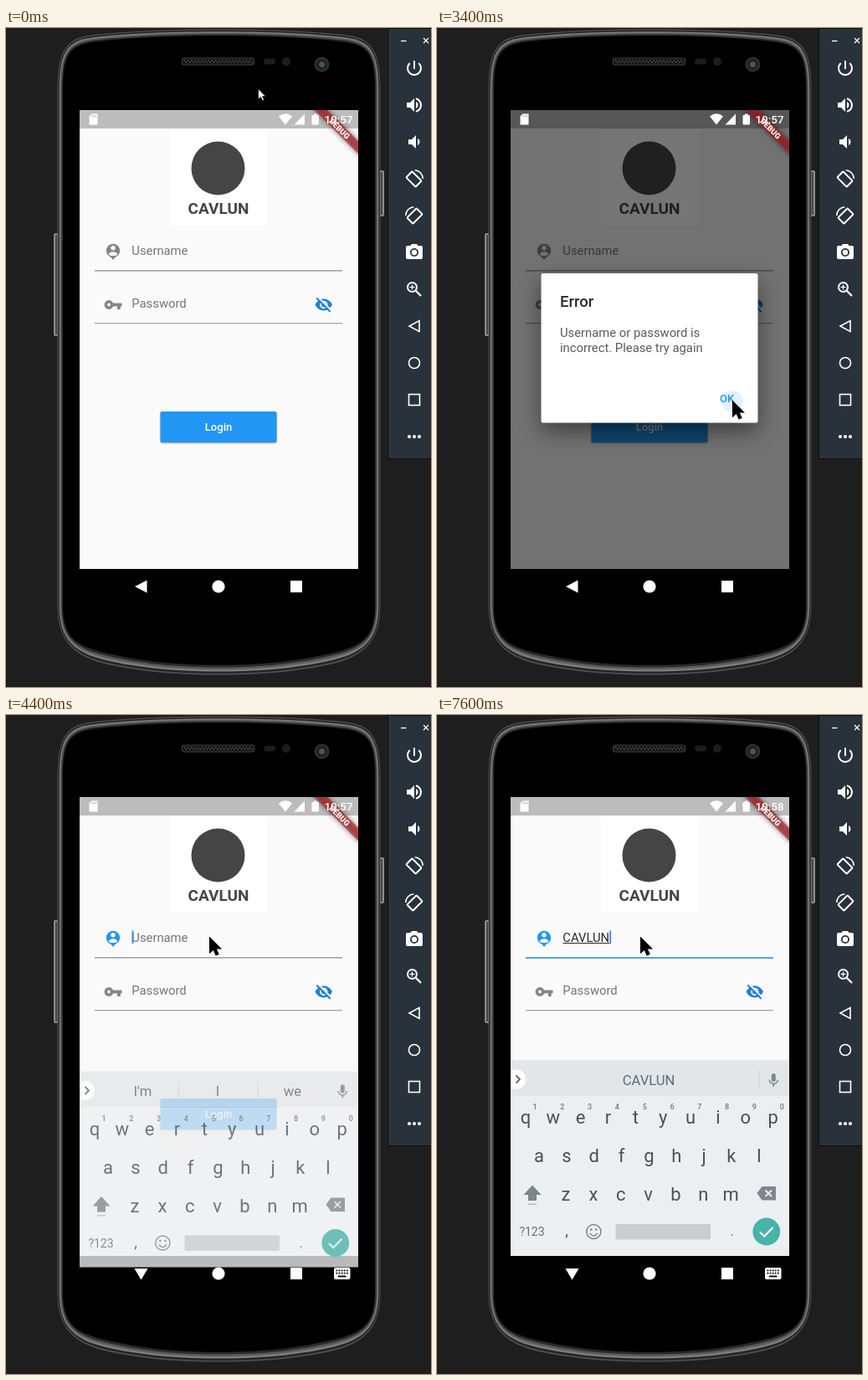
An HTML page with a canvas that plays this animation: 508x787 px, repeating every 8000 ms.

```html
<!DOCTYPE html>
<html lang="en">
<head>
<meta charset="utf-8">
<title>Login demo</title>
<style>
html, body { margin: 0; width: 100%; height: 100%; overflow: hidden; background: #1e1e1e; }
canvas { display: block; }
</style>
</head>
<body>
<canvas id="stage" width="508" height="787"></canvas>
<script>
const ctx = document.getElementById('stage').getContext('2d');
const LOOP = 8000, TICK = 1000 / 15;
const BLUE = '#2196f3', NAME = 'CAVLUN';
const clamp = v => Math.max(0, Math.min(1, v));
const smooth = v => v * v * (3 - 2 * v);

// --- helpers -------------------------------------------------------------
function rect(x, y, w, h, color, r = 0) {
  ctx.fillStyle = color;
  ctx.beginPath();
  ctx.roundRect(x, y, w, h, r);
  ctx.fill();
}
function disc(x, y, r, color) {
  ctx.fillStyle = color;
  ctx.beginPath();
  ctx.arc(x, y, r, 0, Math.PI * 2);
  ctx.fill();
}
function ring(x, y, r, color, w, a = 0, b = Math.PI * 2) {
  ctx.strokeStyle = color;
  ctx.lineWidth = w;
  ctx.beginPath();
  ctx.arc(x, y, r, a, b);
  ctx.stroke();
}
function trace(pts, closed) {
  ctx.beginPath();
  for (let i = 0; i < pts.length; i += 2) ctx.lineTo(pts[i], pts[i + 1]);
  if (closed) ctx.closePath();
}
function poly(color, ...pts) {
  trace(pts, true);
  ctx.fillStyle = color;
  ctx.fill();
}
function line(color, w, ...pts) {
  trace(pts, false);
  ctx.strokeStyle = color;
  ctx.lineWidth = w;
  ctx.stroke();
}
function text(str, x, y, size, color, weight = 400, align = 'left') {
  ctx.font = `${weight} ${size}px Roboto, sans-serif`;
  ctx.textAlign = align;
  ctx.fillStyle = color;
  ctx.fillText(str, x, y);
}
function at(x, y, draw, turn = 0) {
  ctx.save();
  ctx.translate(x, y);
  ctx.rotate(turn);
  draw();
  ctx.restore();
}
function shadow(color, blur, dy) {
  ctx.shadowColor = color;
  ctx.shadowBlur = blur;
  ctx.shadowOffsetY = dy;
}

// --- phone ---------------------------------------------------------------
// Outline inset by d; the rim is wider at the top and bottom ends.
function body(d) {
  const l = 61.5 + d, r = 447.5 - d, t = 1.5 + d * 1.2, b = 772.5 - d * 1.8;
  ctx.beginPath();
  ctx.moveTo(l, 690);
  ctx.lineTo(l, 75);
  ctx.bezierCurveTo(l, 30, l + 8, t + 11, l + 40, t + 7);
  ctx.bezierCurveTo(l + 90, t + 1, 210, t, 254.5, t);
  ctx.bezierCurveTo(299, t, r - 90, t + 1, r - 40, t + 7);
  ctx.bezierCurveTo(r - 8, t + 11, r, 30, r, 75);
  ctx.lineTo(r, 690);
  ctx.bezierCurveTo(r, 733, r - 20, b - 21, r - 62, b - 12);
  ctx.bezierCurveTo(r - 110, b - 2, 295, b, 254.5, b);
  ctx.bezierCurveTo(214, b, l + 110, b - 2, l + 62, b - 12);
  ctx.bezierCurveTo(l + 20, b - 21, l, 733, l, 690);
  ctx.closePath();
}
function phone() {
  for (const [x, y, h] of [[57, 245, 123], [446, 170, 55]]) {
    rect(x, y, 6, h, '#8c8c8c', 2);
    rect(x + 2, y + 2, 2, h - 4, '#484848');
  }
  const rims = [[0, '#4e4e4e'], [1, '#232323'], [2.2, '#7c7c7c'], [3.6, '#5a5a5a'], [5, '#2a2a2a'], [6.5, '#000']];
  for (const [d, color] of rims) {
    body(d);
    ctx.fillStyle = color;
    ctx.fill();
  }
  rect(210, 35.5, 87, 9, '#444', 3);
  rect(211, 36.5, 85, 7, '#151515', 2);
  for (let i = 0; i < 40; i++) rect(213 + i * 2.05, 38 + (i % 2) * 2, 1.2, 2, '#555');
  rect(308, 36.5, 14, 7, '#1d1d1d', 3.5);
  disc(335, 40, 5, '#1d1d1d');
  disc(377.5, 43.5, 9, '#2b3236');
  disc(377.5, 43.5, 6.5, '#1a2024');
  disc(377.5, 43.5, 3.5, '#46545c');
}

// --- emulator toolbar ----------------------------------------------------
function speaker(loud) {
  poly('#fff', -9, -3, -5, -3, 0, -8, 0, 8, -5, 3, -9, 3);
  ctx.fillStyle = '#fff';
  ctx.beginPath();
  ctx.arc(0, 0, 4.5, -1.1, 1.1);
  ctx.fill();
  if (loud) ring(0, 0, 8, '#fff', 2, -1.32, 1.32);
}
function rotateIcon(dir) {
  ctx.scale(dir, 1);
  at(-0.5, 0.5, () => {
    ctx.strokeStyle = '#fff';
    ctx.lineWidth = 2;
    ctx.beginPath();
    ctx.roundRect(-5, -8, 10, 16, 1);
    ctx.stroke();
  }, -Math.PI / 4);
  ring(0, 0, 10.3, '#fff', 1.6, -1.5, 0);
}
function toolbar() {
  rect(456, 0, 52, 515, '#0b0e10');
  rect(457, 1, 51, 513, '#29323a');
  const W = '#fff';
  line(W, 1.3, 472, 15.5, 478.5, 15.5);
  line(W, 1.3, 499, 12, 505, 18);
  line(W, 1.3, 505, 12, 499, 18);
  ring(488, 48, 8, W, 2, -0.85, Math.PI + 0.85);
  line(W, 2, 488, 39, 488, 49);
  at(488, 92, () => speaker(true));
  at(490, 136, () => speaker(false));
  at(488, 180, () => rotateIcon(1));
  at(488, 224, () => rotateIcon(-1));
  rect(478, 260, 20, 16, W, 2);
  poly(W, 483, 260.5, 485, 258, 491, 258, 493, 260.5);
  disc(488, 268, 5, '#29323a');
  disc(488, 268, 3.2, W);
  ring(485.5, 309.5, 5.5, W, 2);
  line(W, 2.4, 489.5, 313.5, 496, 320);
  line(W, 1.3, 482.5, 309.5, 488.5, 309.5);
  line(W, 1.3, 485.5, 306.5, 485.5, 312.5);
  trace([482, 356, 494, 349.5, 494, 362.5], true);
  ctx.strokeStyle = W;
  ctx.lineWidth = 1.6;
  ctx.stroke();
  ring(488, 400, 6.5, W, 1.6);
  ctx.strokeRect(481.5, 437.5, 13, 13);
  for (const x of [482, 488, 494]) disc(x, 488, 2.1, W);
}

// --- app -----------------------------------------------------------------
function personIcon(color) {
  disc(128, 266, 8.2, color);
  poly(color, 124, 272, 132, 272, 128, 277);
  disc(128, 262.8, 2.7, '#fafafa');
  ctx.fillStyle = '#fafafa';
  ctx.beginPath();
  ctx.ellipse(128, 270.3, 5.2, 3, 0, Math.PI, 0);
  ctx.ellipse(128, 270.3, 5.2, 1.8, 0, 0, Math.PI);
  ctx.fill();
}
function keyIcon() {
  const c = '#858585';
  disc(123, 330.5, 5.4, c);
  rect(127, 328.6, 11.5, 3.8, c);
  rect(133, 330, 3.7, 6, c);
  disc(123, 330.5, 1.9, '#fafafa');
}
function eyeIcon() {
  const c = '#1f7fd6', bg = '#fafafa';
  ctx.fillStyle = c;
  ctx.beginPath();
  ctx.moveTo(369.5, 330.5);
  ctx.bezierCurveTo(374, 321.3, 385.5, 321.3, 390, 330.5);
  ctx.bezierCurveTo(385.5, 339.7, 374, 339.7, 369.5, 330.5);
  ctx.fill();
  disc(379.8, 330.5, 4.7, bg);
  disc(379.8, 330.5, 2.8, c);
  line(bg, 2, 373, 321.5, 389, 337.5);
  line(c, 1.8, 371.3, 322.5, 387.7, 339);
}
function form(n, typed) {
  const focused = n >= 64;
  rect(88, 98, 333, 548, '#fafafa');
  rect(88, 98, 333, 22, '#bcbcbc');
  rect(196, 120, 116.5, 116.5, '#fff');
  disc(253.5, 167.5, 32, '#454545');
  text(NAME, 254, 222, 19, '#454545', 700, 'center');

  personIcon(focused ? BLUE : '#858585');
  const hint = typed ? 1 - clamp((n - 83) / 4) : 1;
  if (hint > 0) {
    ctx.globalAlpha = hint;
    text('Username', 150.3, 270.5, 14.8, '#757575');
    ctx.globalAlpha = 1;
  }
  let caret = 150.5;
  if (typed) {
    const word = NAME.slice(0, typed);
    text(word, 150.3, 270.5, 14.8, '#2b2b2b');
    const w = ctx.measureText(word).width;
    rect(150.5, 272, w, 1, '#2b2b2b');
    caret += w;
  }
  if (focused && !(n >= 71 && n < 78)) rect(caret, 257.5, 1.8, 15.5, '#4285f4');
  if (n >= 68) rect(106, 289, 296, 2, '#4ea4ef');
  else rect(106, 289.2, 296, 1.2, '#8c8c8c');

  keyIcon();
  text('Password', 150.3, 333.5, 14.8, '#757575');
  eyeIcon();
  rect(106, 352.2, 296, 1, '#8c8c8c');

  ctx.save();
  shadow('rgba(0,0,0,.35)', 2, 1);
  rect(184.5, 458, 139, 37, BLUE, 2);
  ctx.restore();
  text('Login', 254, 481.3, 13, '#fff', 500, 'center');
}
function dialog(n) {
  const fade = n < 34 ? 0 : n <= 51 ? 1 : [0.4, 0.025][n - 52] || 0;
  if (!fade) return;
  ctx.save();
  rect(88, 98, 333, 548, `rgba(0,0,0,${0.54 * fade})`);
  ctx.globalAlpha = fade;
  ctx.save();
  shadow(`rgba(0,0,0,${0.45 * fade})`, 26, 10);
  rect(124.5, 293, 259, 178.5, '#fff', 2);
  ctx.restore();
  if (n >= 49) disc(353, 446, 5 + (n - 48) * 2.6, 'rgba(33,150,243,.13)');
  text('Error', 147, 333, 18.5, '#2b2b2b', 500);
  text('Username or password is', 147, 369, 14.8, '#5a5a5a');
  text('incorrect. Please try again', 147, 386.7, 14.8, '#5a5a5a');
  text('OK', 338, 446.8, 13, BLUE, 500);
  ctx.restore();
}
function banner() {
  ctx.save();
  ctx.beginPath();
  ctx.rect(88, 98, 333, 548);
  ctx.clip();
  at(421, 98, () => {
    shadow('rgba(0,0,0,.8)', 6, 0);
    rect(-40, 25.9, 80, 11.1, 'rgba(183,28,28,.63)');
    ctx.shadowColor = 'transparent';
    text('DEBUG', 0, 34.8, 9.4, '#fff', 900, 'center');
  }, Math.PI / 4);
  ctx.restore();
}
function statusBar(n) {
  const W = '#fff';
  poly(W, 102.5, 102.5, 109.5, 102.5, 109.5, 115.5, 99.5, 115.5, 99.5, 105.5);
  for (let i = 0; i < 3; i++) rect(102.5 + i * 2.2, 104, 1, 2.5, '#aaa');
  ctx.fillStyle = W;
  ctx.beginPath();
  ctx.moveTo(334, 115.5);
  ctx.lineTo(326, 105.5);
  ctx.quadraticCurveTo(334, 99, 342, 105.5);
  ctx.fill();
  poly(W, 357, 102.5, 357, 115.5, 344.5, 115.5);
  rect(365.5, 104, 8.5, 11.5, W, 1);
  rect(368, 102.5, 3.5, 2, W);
  text(n < 74 ? '10:57' : '10:58', 380.5, 114, 13.4, W, 500);
}
function navBar(n) {
  const W = '#fff';
  rect(88, 646, 333, 46, '#000');
  if (n < 64) poly(W, 154, 667, 168.5, 659.5, 168.5, 674.5);
  else poly(W, 153.5, 661, 169.5, 661, 161.5, 674.5);
  disc(254, 667, 7.6, W);
  rect(340, 660, 14, 14, W);
  if (n < 64) return;
  rect(392, 660, 19.5, 14, W, 2);
  for (let i = 0; i < 10; i++) rect(394.5 + (i % 5) * 3.1, 662.5 + (i > 4) * 3.2, 1.8, 1.8, '#000');
  rect(397, 669.5, 9.5, 1.8, '#000');
}

// --- keyboard ------------------------------------------------------------
const SUGGEST = [
  ['C', 'Can', 'Call'],
  ['C', 'Can', 'Call'],
  ['Ca', 'CA', 'Car'],
  ['Cave', 'CAV', 'Caves'],
  ['Cavil', 'CAVL', 'Cavalry'],
  ['Cavity', 'CAVLU', 'Cavalier']
];
function suggestions(n, typed) {
  const c = '#626c72';
  if (typed === NAME.length) {
    text(NAME, 253, 441.5, 16.6, c, 400, 'center');
    rect(384.5, 424, 1, 23, '#ccd0d2');
    return;
  }
  const words = n < 83 ? ["I'm", 'I', 'we'] : SUGGEST[typed];
  words.forEach((w, i) => text(w, 163.5 + i * 89.4, 441.5, 16.6, c, 400, 'center'));
  for (const x of [206, 300.5]) rect(x, 424, 1, 23, '#ccd0d2');
}
function keyboard(n, typed) {
  if (n < 64) return;
  const k = n - 64;
  const ink = '#47525a', soft = '#7d878d';
  const upper = n === 98 || n === 99;
  ctx.save();
  ctx.translate(0, [46, 29, 13.5, 4][k] || 0);
  ctx.globalAlpha = [0.25, 0.55, 0.78, 0.93][k] || 1;
  rect(88, 413, 333, 42, '#e3e6e8');
  rect(88, 455, 333, 191, '#eceff1');
  rect(88, 412, 333, 1, 'rgba(0,0,0,.06)');
  rect(88, 423.5, 18, 23, '#fff', [0, 11, 11, 0]);
  line('#666', 1.8, 94.5, 430.5, 99, 435, 94.5, 439.5);
  suggestions(n, typed);
  rect(399.8, 428, 5, 10, soft, 2.5);
  ring(402.3, 435.5, 5, soft, 1.5, 0, Math.PI);
  line(soft, 1.6, 402.3, 440, 402.3, 444);

  const rows = [['qwertyuiop', 106, 488], ['asdfghjkl', 122, 534], ['zxcvbnm', 154, 580]];
  for (const [keys, x, y] of rows) {
    [...keys].forEach((key, i) =>
      text(upper ? key.toUpperCase() : key, x + i * 32.85, y, 22, ink, 400, 'center'));
  }
  for (let i = 0; i < 10; i++) text((i + 1) % 10, 117 + i * 32.8, 471, 9, '#6c777d', 500, 'center');

  poly(upper ? '#45b0a5' : soft, 114, 561.5, 124.5, 573, 119, 573, 119, 580, 109, 580, 109, 573, 103.5, 573);
  rect(109, 583.5, 10, 1.5, '#b4babd');
  poly(soft, 382.5, 571, 388.5, 563, 405, 563, 405, 579.5, 388.5, 579.5);
  line('#eceff1', 1.8, 392.5, 567.5, 400, 575);
  line('#eceff1', 1.8, 400, 567.5, 392.5, 575);

  text('?123', 113.5, 622, 14, '#66727a', 400, 'center');
  text(',', 155, 622, 18, ink, 400, 'center');
  text('.', 352.5, 622, 18, soft, 400, 'center');
  ring(187.3, 617, 8.6, soft, 1.5);
  disc(184.3, 614.5, 1.3, soft);
  disc(190.3, 614.5, 1.3, soft);
  ring(187.3, 617.5, 4.4, soft, 1.4, 0.3, Math.PI - 0.3);
  rect(213.5, 608, 113.5, 18.5, '#c9cdd0', 2);
  disc(393.8, 617, 16.4, '#48b3a8');
  line('#fff', 2, 386, 617.5, 391.3, 622.5, 401.5, 612);
  ctx.restore();
}

// --- pointer -------------------------------------------------------------
const MOVES = [
  [1, 301, 72], [4, 235, 280], [17, 235, 280], [23, 264, 472], [38, 264, 472],
  [44, 360, 454], [46, 360, 454], [48, 353, 445], [53, 353, 445], [59, 243, 265]
];
function pointer(n) {
  let [, x, y] = MOVES[0];
  for (let i = 1; i < MOVES.length; i++) {
    const [a, ax, ay] = MOVES[i - 1], [b, bx, by] = MOVES[i];
    if (n <= a) break;
    const p = smooth(clamp((n - a) / (b - a)));
    x = ax + (bx - ax) * p;
    y = ay + (by - ay) * p;
  }
  const pressed = [[24, 34], [49, 51], [60, 64]].some(([a, b]) => n >= a && n < b);
  const small = n < 2;
  at(x, y, () => {
    const s = small ? 0.74 : 1.1;
    ctx.translate(0.5, 0.8);
    ctx.scale(s, s);
    trace([0, 0, 0, 16.5, 4, 13, 6.8, 19, 9.6, 17.8, 6.8, 12, 12, 12], true);
    ctx.lineJoin = 'miter';
    ctx.lineWidth = pressed ? 2 : 1;
    ctx.strokeStyle = '#000';
    ctx.fillStyle = small ? '#fff' : pressed ? '#d9661c' : '#000';
    ctx.fill();
    ctx.stroke();
  });
}

// --- loop ----------------------------------------------------------------
const KEYS = [84, 90, 98, 105, 109, 114];
function render(ms) {
  const n = Math.floor((ms % LOOP + 4) / TICK);
  const typed = KEYS.filter(k => n >= k).length;
  rect(0, 0, 508, 787, '#1e1e1e');
  rect(0, 785, 508, 2, '#211a20');
  phone();
  toolbar();
  form(n, typed);
  dialog(n);
  banner();
  statusBar(n);
  navBar(n);
  keyboard(n, typed);
  pointer(n);
}
const start = performance.now();
function frame() {
  render(performance.now() - start);
  requestAnimationFrame(frame);
}
frame();
</script>
</body>
</html>
```
